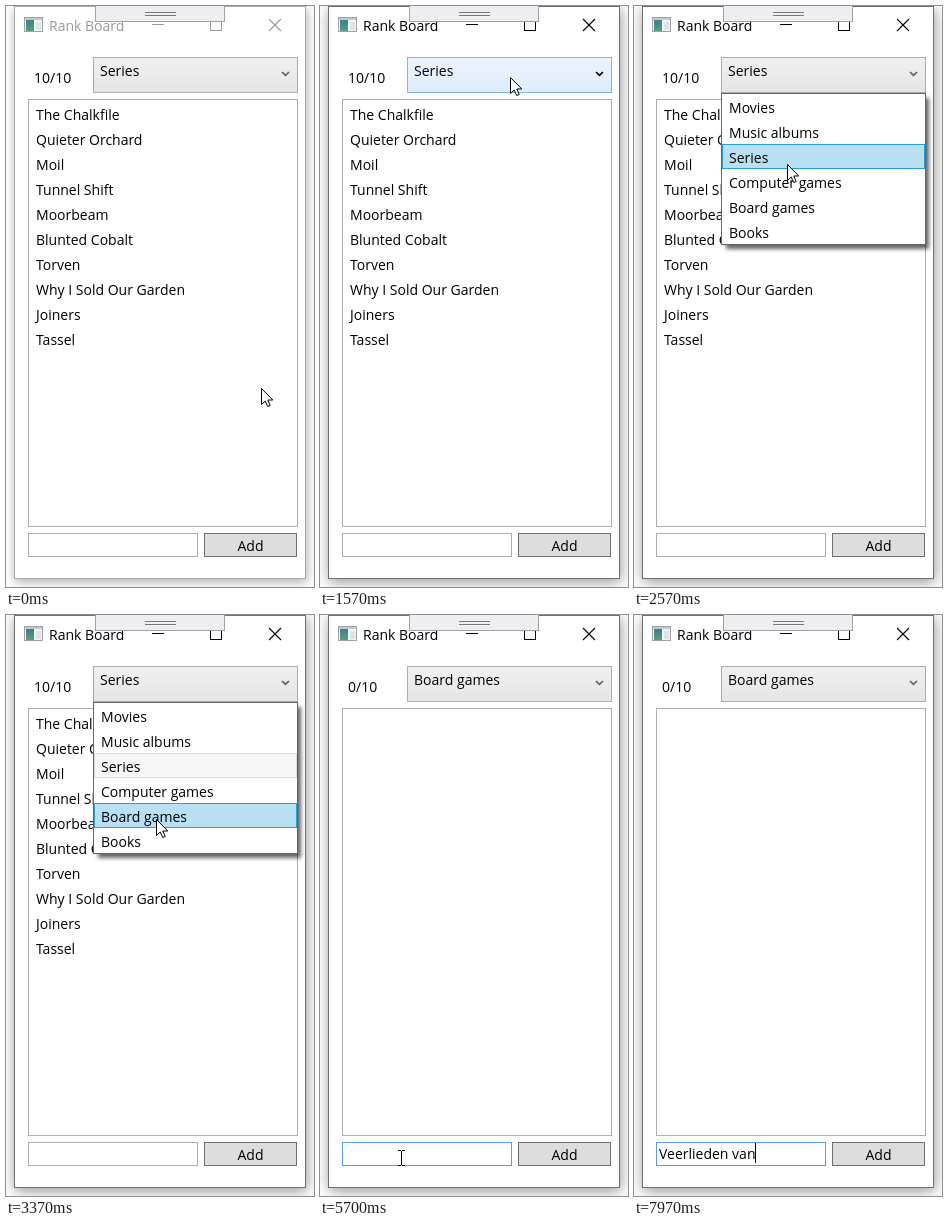
An HTML page with a canvas that plays this animation: 308x581 px, repeating every 8000 ms.

```html
<!DOCTYPE html>
<html lang="en">
<head>
<meta charset="utf-8">
<title>Rank Board</title>
<style>
  html, body { margin: 0; width: 100%; height: 100%; overflow: hidden; background: #fff; }
  canvas { display: block; }
</style>
</head>
<body>
<canvas id="stage" width="308" height="581"></canvas>
<script>
const ctx = document.getElementById('stage').getContext('2d');
const LOOP = 8000, STEP = 200 / 3;
const FONT = '14px "Open Sans", "Noto Sans", sans-serif';

const SERIES = ['The Chalkfile', 'Quieter Orchard', 'Moil', 'Tunnel Shift', 'Moorbeam',
  'Blunted Cobalt', 'Torven', 'Why I Sold Our Garden', 'Joiners', 'Tassel'];
const CATEGORIES = ['Movies', 'Music albums', 'Series', 'Computer games', 'Board games', 'Books'];
const TYPED = 'Veerlieden van';

// event times in ms
const ACTIVE = 1570, CHOSEN = 3770, BEAM = 4900, FOCUS = 5170, TYPING = 6370, FAST = 7370;
const BLINK = 535, ROW = 25;

const linear = p => p;
const smooth = p => p * p * (3 - 2 * p);
const easeIn = n => p => p ** n;
const easeOut = n => p => 1 - (1 - p) ** n;

const START = { x: 255, y: 382 };
const MOVES = [
  { from: 433, to: 1240, x: 190, y: 71, easeX: linear, easeY: easeOut(1.63) },
  { from: 1973, to: 2833, x: 151, y: 210, easeX: easeOut(2.6), easeY: easeIn(1.27) },
  { from: 3033, to: 3367, x: 150, y: 204, easeX: linear, easeY: linear },
  { from: 4033, to: 4633, x: 79, y: 535, easeX: smooth, easeY: smooth }
];

function pointer(t) {
  let { x, y } = START;
  for (const m of MOVES) {
    const p = Math.min(1, Math.max(0, (t - m.from) / (m.to - m.from)));
    x += (m.x - x) * m.easeX(p);
    y += (m.y - y) * m.easeY(p);
  }
  return { x: Math.round(x), y: Math.round(y) };
}

// slow first word, then a faster burst
function typedText(t) {
  const count = t < FAST ? 1 + Math.floor((t - TYPING) / 160) : 7 + Math.floor((t - FAST) / 85);
  return TYPED.slice(0, Math.max(0, count));
}

function fill(x, y, w, h, color) {
  ctx.fillStyle = color;
  ctx.fillRect(x, y, w, h);
}

function box(x, y, w, h, color, border) {
  if (color) fill(x, y, w, h, color);
  ctx.strokeStyle = border;
  ctx.lineWidth = 1;
  ctx.strokeRect(x + .5, y + .5, w - 1, h - 1);
}

function text(s, x, y, color = '#000') {
  ctx.fillStyle = color;
  ctx.fillText(s, x, y);
}

function line(color, width, ...pts) {
  ctx.strokeStyle = color;
  ctx.lineWidth = width;
  ctx.beginPath();
  pts.forEach(([x, y]) => ctx.lineTo(x, y));
  ctx.stroke();
}

function gradient(y, h, top, bottom) {
  const g = ctx.createLinearGradient(0, y, 0, y + h);
  g.addColorStop(0, top);
  g.addColorStop(1, bottom);
  return g;
}

function shadowed(blur, dx, dy, alpha, draw) {
  ctx.save();
  ctx.shadowColor = `rgba(0,0,0,${alpha})`;
  ctx.shadowBlur = blur;
  ctx.shadowOffsetX = dx;
  ctx.shadowOffsetY = dy;
  draw();
  ctx.restore();
}

function drawWindow(active) {
  const ink = active ? '#000' : '#999';
  fill(0, 0, 308, 581, '#fff');
  shadowed(active ? 13 : 10, 1, 3, active ? .42 : .32, () => fill(8, 0, 292, 573, '#fff'));
  box(8, 0, 292, 573, '#fff', active ? '#707070' : '#aaa');

  box(18, 11, 19, 15, '#f4f4f4', '#9aa2a6');
  fill(19, 12, 17, 2, '#c3cace');
  fill(20, 14, 8, 11, gradient(14, 11, '#3d7f8c', '#5c9c80'));
  fill(30, 16, 5, 8, '#dfe3e5');

  text('Rank Board', 43, 25, ink);
  fill(146, 18, 12, 1, ink);
  box(204, 13, 12, 12, null, ink);
  line(ink, 1.1, [263, 13], [275, 25]);
  line(ink, 1.1, [275, 13], [263, 25]);

  box(89, -1, 130, 17, '#eeeef2', '#a0a0a6');
  for (const y of [6, 9]) fill(139, y, 31, 1, '#77777c');
}

function drawCombo(label, hover) {
  const back = hover ? gradient(51, 36, '#ecf4fc', '#dcecfc') : gradient(51, 36, '#f0f0f0', '#e5e5e5');
  box(87, 51, 205, 36, back, hover ? '#7eb4ea' : '#acacac');
  text(label, 94, 70);
  line(hover ? '#000' : '#606060', 1.7, [276, 66], [279.5, 69.3], [283, 66]);
}

function drawList(items, hover) {
  box(22, 93, 270, 428, '#fff', '#abadb3');
  items.forEach((name, i) => {
    const y = 95 + ROW * i;
    if (i === hover) box(24, y, 265, ROW, '#e5f3fb', '#67bce5');
    text(name, 30, y + 19);
  });
}

function drawPopup(open, hover) {
  const h = Math.round(152 * open), selected = 2;
  const lit = hover < 0 ? selected : hover;
  shadowed(4, 4, 4, .6, () => fill(88, 88, 203, h - 1, '#fff'));
  ctx.save();
  ctx.beginPath();
  ctx.rect(87, 87, 205, h);
  ctx.clip();
  ctx.translate(0, h - 152);
  box(87, 87, 205, 152, '#fff', '#646464');
  CATEGORIES.forEach((name, i) => {
    const y = 88 + ROW * i;
    if (i === lit) box(88, y, 203, ROW, hover < 0 ? '#cbe8f6' : '#b8dff2', '#26a0da');
    else if (i === selected) box(88, y, 203, ROW, '#f6f6f6', '#dadada');
    text(name, 95, y + 19);
  });
  ctx.restore();
}

function drawEntry(t, hover) {
  const focused = t >= FOCUS, typed = typedText(t);
  box(22, 527, 170, 24, '#fff', focused ? '#569de5' : hover ? '#7eb4ea' : '#abadb3');
  text(typed, 25, 544);
  const caret = typed || Math.floor((t - FOCUS + 5) / BLINK) % 2 === 0;
  if (focused && caret) fill(Math.round(25 + ctx.measureText(typed).width), 528, 1, 20, '#000');

  box(198, 527, 93, 24, '#ddd', '#707070');
  ctx.textAlign = 'center';
  text('Add', 244.5, 545);
  ctx.textAlign = 'left';
}

function drawArrow({ x, y }) {
  ctx.save();
  ctx.translate(x + .5, y + .5);
  ctx.beginPath();
  [[0, 0], [0, 16], [3.7, 12.5], [6.2, 18], [8.7, 17], [6.3, 11.5], [11.3, 11.5]]
    .forEach(([px, py]) => ctx.lineTo(px, py));
  ctx.closePath();
  ctx.fillStyle = '#fff';
  ctx.fill();
  ctx.strokeStyle = '#000';
  ctx.lineWidth = 1;
  ctx.stroke();
  ctx.restore();
}

function drawBeam() {
  fill(81, 536, 1, 14, '#000');
  for (const y of [535, 550]) {
    fill(78, y, 3, 1, '#000');
    fill(82, y, 3, 1, '#000');
  }
}

function render(t) {
  const step = 500 + Math.floor((t - 496) / STEP) * STEP;
  const now = pointer(step), last = pointer(step - STEP); // row hover trails by one step
  const chosen = t >= CHOSEN;
  const open = chosen ? 0 : Math.min(1, Math.max(0, (step - ACTIVE + 4) / 200));

  ctx.font = FONT;
  drawWindow(t >= ACTIVE);
  text(chosen ? '0/10' : '10/10', 28, 77);
  drawCombo(chosen ? 'Board games' : 'Series', now.y >= 51 && now.y < 87);
  drawList(chosen ? [] : SERIES, open ? -1 : Math.floor((last.y - 95) / ROW));
  drawEntry(t, now.y >= 527);
  if (open > .05) drawPopup(open, Math.floor((last.y - 88) / ROW));
  if (t < BEAM) drawArrow(now);
  else if (t < TYPING) drawBeam();
}

const start = performance.now();
function frame() {
  render((performance.now() - start) % LOOP);
  requestAnimationFrame(frame);
}
frame();
</script>
</body>
</html>
```
